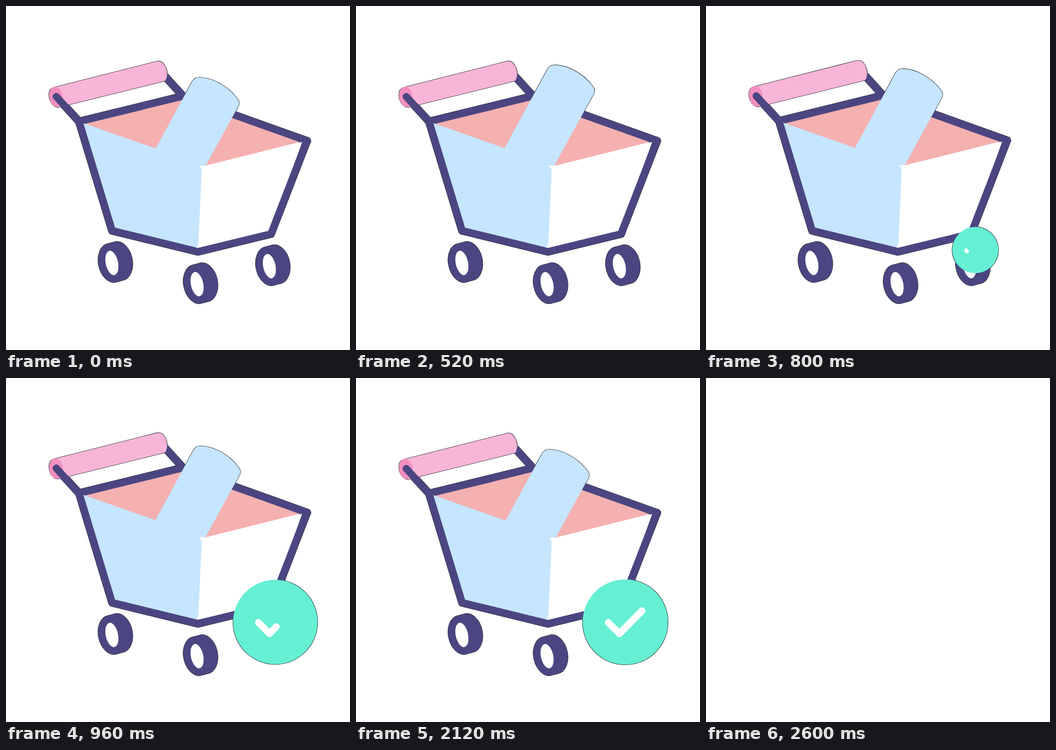
Recreate the animation shown at these times as an HTML page. Size 640x640 px, loop 2.64 s.

```html
<!DOCTYPE html>
<html lang="en">
<head>
<meta charset="utf-8">
<title>Cart</title>
<style>
  html, body { margin: 0; width: 100%; height: 100%; overflow: hidden; background: #fff; }
  svg { display: block; width: 100%; height: 100%; }
  .navy { fill: #4b4682; }
  .bar { fill: none; stroke: #4b4682; stroke-width: 13.600; stroke-linecap: round; stroke-linejoin: round; }
  .blue { fill: #c6e5ff; }
  .mint { fill: #65f0d4; }
  .edge { fill: none; stroke: #2b2b33; stroke-width: 1.600; }
  .barEdge { fill: none; stroke: #2b2b33; stroke-width: 15; stroke-linecap: round; stroke-linejoin: round; }
</style>
</head>
<body>
<svg viewBox="0 0 640 640">
  <defs>
    <path id="bottleShape" d="M346 141Q351 133 358 133C383 132 414 150 430 172Q436 179 432 187L349 338L254 310Z"/>
    <path id="rollShape" d="M89 151.500L281 103C294 100 303 121 298.500 134Q298 138 295 139.500L99 188C88 190 80 177 80 165Q80 154 89 151.500Z"/>
    <path id="backPost" d="M297 132L327 165"/>
    <path id="frontPost" d="M93.500 168.500L136 215"/>
    <path id="rim" d="M136 215L328 168L560 251"/>
    <path id="frame" d="M136 215L197.500 418L357 457L493 424L560 251"/>
    <g id="tyre">
      <ellipse rx="25" ry="36.500" transform="translate(197 478) rotate(-12)"/>
      <ellipse rx="25" ry="36.500" transform="translate(203.500 476.300) rotate(-12)"/>
      <ellipse rx="25" ry="36.500" transform="translate(210 474.500) rotate(-12)"/>
    </g>
    <g id="wheel">
      <use class="edge" href="#tyre"/>
      <use class="navy" href="#tyre"/>
      <ellipse rx="11.500" ry="23" fill="#fff" transform="translate(197 478) rotate(-12)"/>
    </g>
  </defs>

  <g id="scene">
    <!-- hairlines lie lowest, so they only show against the empty background -->
    <circle class="edge" id="badgeEdge" cx="501" cy="454"/>

    <use href="#wheel"/>
    <use href="#wheel" x="158.500" y="39.500"/>
    <use href="#wheel" x="293" y="6"/>

    <g id="cart">
      <use class="edge" href="#bottleShape" id="bottleEdge"/>
      <use class="edge" href="#rollShape"/>
      <g class="barEdge">
        <use href="#backPost"/>
        <use href="#frontPost"/>
        <use href="#rim"/>
        <use href="#frame"/>
      </g>

      <use class="bar" href="#backPost"/>
      <use href="#rollShape" fill="#f8b5d7"/>
      <ellipse rx="12.500" ry="19" fill="#f58fc0" transform="translate(93 169) rotate(-8)"/>
      <use class="bar" href="#frontPost"/>

      <path fill="#f5b0b0" d="M138 217L328 170L555 251L364 299Z"/>
      <use class="bar" href="#rim"/>
      <use class="blue" href="#bottleShape" id="bottle"/>
      <path fill="#fff" d="M357 297L371 297L551 253L491 422L357 453L352 449Z"/>
      <path class="blue" d="M140 216.600L350 290.300L357 296.500Q364 299 364 308L358 438Q357.500 447 353 449.500L200 415Z"/>
      <use class="bar" href="#frame"/>
    </g>

    <g id="badge">
      <circle class="mint" r="80"/>
      <path id="tick" d="M-32 1L-11 22L31 -21" pathLength="1" fill="none" stroke="#fff"
            stroke-width="13" stroke-linecap="round" stroke-linejoin="round"/>
    </g>
  </g>
</svg>
<script>
  const LOOP = 2640, STEP = 40, BLANK_AT = 2600;
  const el = id => document.getElementById(id);
  const [scene, cart, bottle, bottleEdge, badge, badgeEdge, tick] =
    ['scene', 'cart', 'bottle', 'bottleEdge', 'badge', 'badgeEdge', 'tick'].map(el);

  // eased progress of t between two times, 0 to 1
  function ramp(t, from, to) {
    const p = Math.min(1, Math.max(0, (t - from) / (to - from)));
    return p * p * (3 - 2 * p);
  }
  const show = (node, on) => node.setAttribute('visibility', on ? 'inherit' : 'hidden');
  const transform = (value, ...nodes) => nodes.forEach(n => n.setAttribute('transform', value));

  function draw(t) {
    show(scene, t < BLANK_AT);

    const lift = ramp(t, 0, 560) - ramp(t, 560, 1140);
    transform(`translate(${10.2 * lift} ${-23.4 * lift})`, bottle, bottleEdge);

    const stretch = 1 + 0.004 * (ramp(t, 560, 800) - ramp(t, 840, 1120));
    transform(`translate(0 460) scale(1 ${stretch}) translate(0 -460)`, cart);

    const size = ramp(t, 587, 993) - ramp(t, 2098, 2504);
    show(badge, size > 0.012);
    show(badgeEdge, size > 0.012);
    transform(`translate(501 454) scale(${size})`, badge);
    badgeEdge.setAttribute('r', 80 * size);

    const drawn = ramp(t, 740, 1160);
    show(tick, drawn > 0);
    tick.setAttribute('stroke-dasharray', drawn < 1 ? `${drawn} 2` : 'none');
  }

  function play() {
    const t = performance.now() % LOOP;
    draw(Math.floor(t / STEP) * STEP);
    requestAnimationFrame(play);
  }
  play();
</script>
</body>
</html>
```
